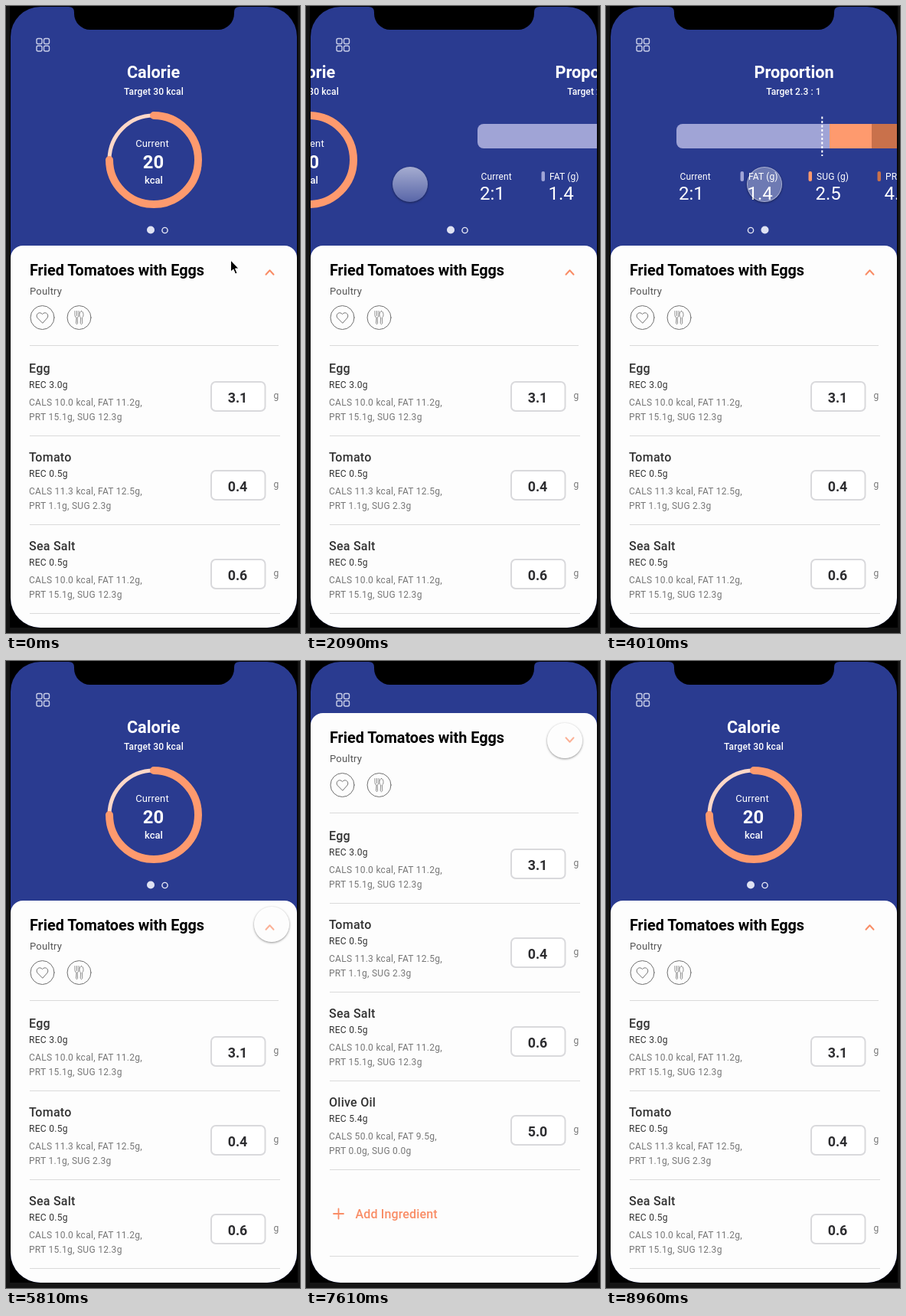
Animation, 384 px wide and 819 px high, one loop 9.71 s. Source, as an HTML page:

```html
<!DOCTYPE html>
<html lang="en">
<head>
<meta charset="utf-8">
<title>Calorie tracker</title>
<style>
html, body { margin: 0; width: 100%; height: 100%; overflow: hidden; background: #141414; }
svg { position: absolute; left: 0; top: 0; display: block; }
text { font-family: Roboto, Arial, sans-serif; }
.med { font-weight: 500; }
.bold { font-weight: 700; }
.mid { text-anchor: middle; }
.line { fill: none; stroke-linecap: round; stroke-linejoin: round; }
#touch {
  position: absolute; left: -23px; top: -23px; width: 46px; height: 46px; box-sizing: border-box;
  border-radius: 50%; box-shadow: 0 1px 3px rgba(0, 0, 0, .45);
  background: linear-gradient(rgba(255, 255, 255, .58), rgba(255, 255, 255, .22));
}
#touch.down { background: rgba(255, 255, 255, .32); border: 1px solid rgba(255, 255, 255, .4); }
</style>
</head>
<body>
<svg id="stage" width="384" height="819" viewBox="0 0 384 819"></svg>
<div id="touch"></div>
<script>
const $ = id => document.getElementById(id);
const LOOP = 9710, PAGE = 374, ORANGE = '#f98d66';

const text = (x, y, size, str, fill = '#fff', cls = '', spacing = .15) =>
  `<text x="${x}" y="${y}" font-size="${size}" fill="${fill}" class="${cls}" style="letter-spacing:${spacing}px">${str}</text>`;
const rule = (y, end = 358) => `<path d="M31 ${y}H${end}" stroke="#dadada" stroke-width="1.1"/>`;

const ingredients = [
  ['Egg', 'REC 3.0g', 'CALS 10.0 kcal, FAT 11.2g,', 'PRT 15.1g, SUG 12.3g', '3.1'],
  ['Tomato', 'REC 0.5g', 'CALS 11.3 kcal, FAT 12.5g,', 'PRT 1.1g, SUG 2.3g', '0.4'],
  ['Sea Salt', 'REC 0.5g', 'CALS 10.0 kcal, FAT 11.2g,', 'PRT 15.1g, SUG 12.3g', '0.6'],
  ['Olive Oil', 'REC 5.4g', 'CALS 50.0 kcal, FAT 9.5g,', 'PRT 0.0g, SUG 0.0g', '5.0']
];
const row = ([name, rec, line1, line2, grams], i) => `<g transform="translate(0 ${116 * i})">
  ${text(30, 166, 16, name, '#333', 'med', .25)}
  ${text(30, 186, 12, rec, '#333', '', .3)}
  ${text(30, 209, 12, line1, '#777', '', .28)}
  ${text(30, 228, 12, line2, '#777', '', .28)}
  <rect x="268" y="178" width="70.5" height="38" rx="6" fill="#fff" stroke="#d9d9dc" stroke-width="2"/>
  ${text(302.5, 204.5, 17.8, grams, '#2d2d30', 'bold mid', 0)}
  ${text(349.5, 200, 12, 'g', '#777')}
  ${rule(248.5)}</g>`;

const nutrient = (x, label, value, color) =>
  (color ? `<rect x="${x - 10.5}" y="216" width="4.5" height="13" rx="2" fill="${color}"/>` : '') +
  text(x, 227, 12, label) + text(x - 1.5, 252.5, 24, value, '#fff', '', 0);

const menu = [[40, 42.5], [49.5, 42.5], [40, 52], [49.5, 52]]
  .map(([x, y]) => `<rect x="${x}" y="${y}" width="7" height="7" rx="2"/>`).join('');

const calorie = `
  ${text(192.5, 93.5, 21.7, 'Calorie', '#fff', 'bold mid', 0)}
  ${text(193, 116, 12, 'Target 30 kcal', '#fff', 'med mid')}
  <path class="line" d="M135 200A58 58 0 0 1 193 143" stroke="#ffd8c8" stroke-width="5"/>
  <path class="line" d="M193 143A58 58 0 1 1 135 201" stroke="#fe9a6e" stroke-width="10"/>
  ${text(191, 184, 13, 'Current', '#fff', 'mid')}
  ${text(192.5, 211.5, 23.8, '20', '#fff', 'bold mid', 0)}
  ${text(193, 232, 13, 'kcal', '#fff', 'med mid', 0)}`;

const proportion = `
  ${text(192.5, 93.5, 21.7, 'Proportion', '#fff', 'bold mid', 0)}
  ${text(192, 116, 12, 'Target 2.3 : 1', '#fff', 'med mid', .1)}
  <g clip-path="url(#bar)">
    <path d="M39 154h200v32H39z" fill="#a0a4d6"/>
    <path d="M239 154h55v32h-55z" fill="#fe9a6e"/>
    <path d="M294 154h52v32h-52z" fill="#c9714b"/>
  </g>
  <path d="M229.3 144.5V196" stroke="#fff" stroke-width="2" stroke-dasharray="3 2.5"/>
  ${nutrient(43.5, 'Current', '2:1')}
  ${nutrient(133, 'FAT (g)', '1.4', '#a0a4d6')}
  ${nutrient(222, 'SUG (g)', '2.5', '#fe9a6e')}
  ${nutrient(312, 'PRT (g)', '4.1', '#c9714b')}`;

const panel = `
  <rect x="6" width="374" height="830" rx="16" fill="#fdfdfd"/>
  ${text(31, 38.5, 19.8, 'Fried Tomatoes with Eggs', '#000', 'bold', 0)}
  ${text(31, 64, 13, 'Poultry', '#555', '', .2)}
  <g class="line" stroke="#707070" stroke-width="1">
    <circle cx="47.5" cy="94" r="15.5"/><circle cx="95.5" cy="94" r="15.5"/>
    <path d="M47.5 101L41.4 94.8C37.5 90.5 43.5 84.8 47.5 89.6C51.5 84.8 57.5 90.5 53.6 94.8Z"/>
    <g stroke-width=".8">
      <path d="M90 85.5v5q0 3 2 3.5l-.5 7.5q1 2.5 2 0L93 94q2-.5 2-3.5v-5M92.5 85.5v6"/>
      <path d="M98.5 85.5c-3 0-3.5 7.5-.9 8.5l-.4 7.5q1.3 2.5 2.6 0l-.4-7.5c2.6-1 2.1-8.5-.9-8.5z"/>
    </g>
  </g>
  <path id="chevron" class="line" d="M-5 2.7L0-2.7L5 2.7" stroke="${ORANGE}" stroke-width="2"/>
  ${rule(130.5, 356)}
  ${ingredients.map(row).join('')}
  <path class="line" d="M36 654H49M42.5 647.5V660.5" stroke="${ORANGE}" stroke-width="1.8"/>
  ${text(64.5, 660, 16, 'Add Ingredient', ORANGE, 'med')}
  ${rule(709.5, 356)}`;

$('stage').innerHTML = `
  <clipPath id="screen"><rect x="6" y="1" width="374" height="811" rx="39"/></clipPath>
  <clipPath id="bar"><rect x="39" y="154" width="307" height="32" rx="8"/></clipPath>
  <path d="M5 0H381V812H5z"/>
  <g clip-path="url(#screen)">
    <path d="M0 0H384V819H0z" fill="#2a3b90"/>
    <g id="pages">${calorie}<g transform="translate(${PAGE} 0)">${proportion}</g></g>
    <circle id="dotOn" cy="292.5" r="5" fill="#dfe2f3"/>
    <circle id="dotOff" cy="293" r="3.6" fill="none" stroke="#e6e8f5" stroke-width="1.4"/>
    <g fill="none" stroke="#c9cee8" stroke-width="1.4">${menu}</g>
    <g id="panel">${panel}</g>
  </g>
  <path d="M82 0V1Q89 1 89 8V10A21 21 0 0 0 110 31H277A21 21 0 0 0 298 10V8Q298 1 305 1V0Z"/>
  <path id="arrow" d="M0 0V15L3.5 12L6 18L8.5 17L6 11H10.5Z" stroke="#fff" stroke-width="1"/>`;

// Pointer path as [time, x, y]
const path = [
  [1050, 352, 233], [1350, 343, 233], [1950, 160, 233], [2090, 136, 233],
  [3710, 136, 233], [3860, 150, 233], [4010, 207, 233], [4160, 270, 240],
  [4310, 305, 275], [4460, 318, 330], [4760, 318, 400], [4910, 322, 392],
  [5360, 347, 344], [6110, 347, 344], [6260, 344, 290], [6560, 331, 130],
  [6710, 329, 111], [7160, 338, 104], [8210, 338, 104], [8360, 338, 520],
  [8510, 338, 772], [8660, 338, 772], [8810, 338, 795], [8960, 338, 850]
];
const presses = [[1350, 2090], [3560, 4310], [5810, 5960], [7610, 7760]];

const between = (t, a, b) => t >= a && t < b;
const easeOut = (t, start, length, power = 3) =>
  1 - (1 - Math.min(1, Math.max(0, (t - start) / length))) ** power;

function pointer(t) {
  const i = path.findIndex(k => k[0] > t);
  if (i < 1) return path.at(i).slice(1);
  const [t0, x0, y0] = path[i - 1], [t1, x1, y1] = path[i];
  const u = (t - t0) / (t1 - t0);
  return [x0 + (x1 - x0) * u, y0 + (y1 - y0) * u];
}

// Pages follow the finger, then settle after release
function scroll(t, x) {
  if (t < 1350) return 0;
  if (t < 2090) return Math.max(0, 325 - x);
  if (t < 3560) return 189 + (PAGE - 189) * easeOut(t, 2090, 1020, 2.5);
  if (t <= 4160) return PAGE - Math.max(0, x - 154);
  return 258 * (1 - easeOut(t, 4160, 600, 2.5));
}

// The picture advances in steps of 150 ms
function snap(t) {
  const base = t >= 3110 ? 3110 : t >= 2090 ? 2090 : 0;
  return base + Math.floor((t - base) / 150) * 150;
}

function draw(t) {
  const [x, y] = pointer(t);
  const open = easeOut(t, 5810, 400) - easeOut(t, 7610, 400);
  const second = between(t, 3110, 4910);
  const touch = $('touch');

  $('pages').setAttribute('transform', `translate(${-scroll(t, x)} 0)`);
  $('dotOn').setAttribute('cx', second ? 207.5 : 189);
  $('dotOff').setAttribute('cx', second ? 189 : 207.5);
  $('panel').setAttribute('transform', `translate(0 ${Math.round(313 - 245 * open)})`);
  $('chevron').setAttribute('transform', `translate(344.5 35) scale(1 ${open > .5 ? -1 : 1})`);

  $('arrow').setAttribute('transform', t < 150 ? 'translate(293.5 332)' : 'translate(302 239)');
  $('arrow').style.display = t < 300 ? '' : 'none';
  touch.style.display = between(t, 1050, 8960) ? '' : 'none';
  touch.style.transform = `translate(${x}px, ${y}px)`;
  touch.className = presses.some(([a, b]) => between(t, a, b)) ? 'down' : '';
}

const start = performance.now();
function tick() {
  draw(snap((performance.now() - start) % LOOP));
  requestAnimationFrame(tick);
}
tick();
</script>
</body>
</html>
```
